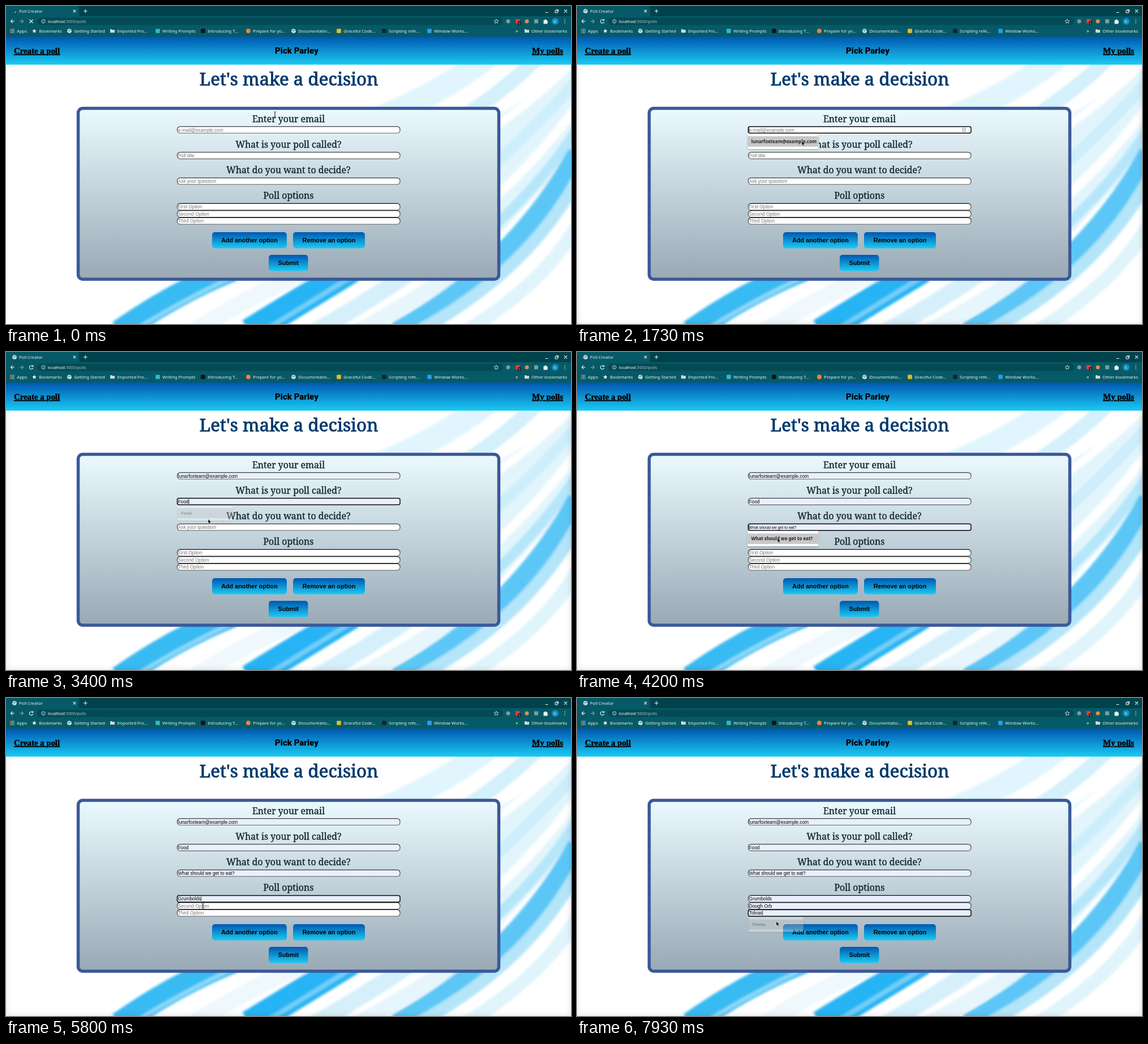
Animation of 998 by 561 pixels, one loop 8000 ms. Source, as an HTML page:

```html
<!DOCTYPE html>
<html lang="en">
<head>
<meta charset="utf-8">
<title>Poll Creator</title>
<style>
  html, body { margin: 0; width: 100%; height: 100%; overflow: hidden; background: #fff; }
  svg { position: absolute; left: 0; top: 0; }
  text { white-space: pre; }
  .ui { font: 7.6px "Noto Sans", sans-serif; fill: #e9f1f2; }
  .url { font-size: 7.2px; fill: #fff; }
  .title { font: 31.3px "Noto Serif", serif; fill: #03396c; stroke: #03396c; stroke-width: .9; text-anchor: middle; }
  .label { font: 15.9px "Noto Serif", serif; fill: #10262b; stroke: #10262b; stroke-width: .35; text-anchor: middle; }
  .nav { font: bold 14.8px "Liberation Serif", serif; stroke: #000; stroke-width: .45; text-decoration: underline; }
  .brand { font: 900 15px Roboto, sans-serif; text-anchor: middle; }
  .button { font: bold 10.8px "Liberation Sans", sans-serif; text-anchor: middle; }
  .value { font: 8.28px "Liberation Sans", sans-serif; }
  .hint { font: 600 8px "Noto Sans", sans-serif; fill: #222; }
</style>
</head>
<body>
<svg id="stage" width="998" height="561" viewBox="0 0 998 561">
  <defs>
    <linearGradient id="sea" x2="0" y2="1"><stop stop-color="#0057b0"/><stop offset="1" stop-color="#1bcaf3"/></linearGradient>
    <linearGradient id="panel" x2="0" y2="1"><stop stop-color="#ebfaff"/><stop offset="1" stop-color="#99a9b5"/></linearGradient>
    <linearGradient id="rim" x2="0" y2="1"><stop stop-color="#111"/><stop offset="1" stop-color="#666"/></linearGradient>
    <filter id="soft"><feGaussianBlur stdDeviation="2"/></filter>
    <filter id="edgeBlur"><feGaussianBlur stdDeviation="5"/></filter>
    <filter id="shade" x="-10%" y="-20%" width="120%" height="150%"><feDropShadow dx="0" dy="1" stdDeviation="1" flood-opacity=".4"/></filter>
    <g id="globe"><circle r="3.8" fill="#e9f1f2"/><path d="M-3-1l2 .2 1 1.3-1 2M1-3l-.5 1.5 2.5 1" fill="none" stroke="#065a67"/></g>
    <path id="folder" d="M-4-3h3l1 1h4v5h-8z" fill="#cfd8da"/>
    <path id="star" d="M0-3.8l1.1 2.5 2.7.2-2 1.8.6 2.7L0 2l-2.4 1.4.6-2.7-2-1.8 2.7-.2z"/>
  </defs>

  <g id="ribbons" fill="none" filter="url(#soft)">
    <path d="M790 230Q900 190 1010 90V270Q930 330 860 420z" fill="#e2f5fc"/>
    <path d="M640 205Q760 160 850 90" stroke="#e0f5fd" stroke-width="42"/>
    <path d="M800 200Q880 150 940 90" stroke="#d3f0fb" stroke-width="26"/>
    <path d="M840 230Q930 170 1005 95" stroke="#fff" stroke-width="14"/>
    <path d="M850 290Q940 210 1010 130" stroke="#cdeefb" stroke-width="20"/>
    <path d="M850 350Q940 270 1010 175" stroke="#fff" stroke-width="16"/>
    <path d="M850 400Q950 310 1010 215" stroke="#b5e6fa" stroke-width="18"/>
    <path d="M200 575Q300 505 400 465" stroke="#38baf3" stroke-width="42"/>
    <path d="M222 575Q300 525 400 478" stroke="#8fdaf8" stroke-width="7"/>
    <path d="M330 575Q440 505 540 465" stroke="#eef8fd" stroke-width="30"/>
    <path d="M430 575Q520 520 610 465" stroke="#27b4f4" stroke-width="48"/>
    <path d="M452 575Q550 515 630 465" stroke="#74d0f8" stroke-width="8"/>
    <path d="M545 575Q650 515 720 465" stroke="#d5f0fb" stroke-width="30"/>
    <path d="M620 575Q730 515 800 465" stroke="#e6f6fc" stroke-width="28"/>
    <path d="M690 575Q900 460 1010 260" stroke="#5cc7f6" stroke-width="36"/>
    <path d="M725 575Q920 470 1010 305" stroke="#b4e5f9" stroke-width="22"/>
    <path d="M810 575Q950 490 1010 385" stroke="#e0f4fc" stroke-width="24"/>
  </g>
  <rect id="edge" x="-2" y="54" width="1002" height="509" fill="none" stroke="#000" stroke-opacity=".1" stroke-width="7" filter="url(#edgeBlur)"/>
  <rect y="54" width="998" height="49.5" fill="url(#sea)"/>
  <text class="nav" x="14" y="84">Create a poll</text>
  <text class="nav" x="984" y="84" text-anchor="end">My polls</text>
  <text class="brand" x="513.5" y="84">Pick Parley</text>

  <rect width="998" height="54" fill="#00434d"/>
  <path d="M0 18V0h125q4 0 4 4v14h869v36H0z" fill="#065a67"/>
  <rect x="55" y="20.5" width="823" height="13" rx="6.5" fill="#044a55"/>
  <g fill="none" stroke="#e9f1f2" stroke-width="1.1">
    <path d="M118.7 6.7l4.6 4.6m0-4.6l-4.6 4.6M137 9h6.6M140.3 5.7v6.6M952.5 11.5h5M986 6.5l5 5m0-5l-5 5M970 8h4v4h-4zM971.5 6.5h4v4"/>
    <path d="M15 27H8.5m3-3l-3 3 3 3"/>
    <path d="M24 27h6.5m-3-3l3 3-3 3" stroke="#7fa4aa"/>
    <path id="stop" d="M41.5 24l6 6m0-6l-6 6"/>
    <path id="reload" d="M47 25a3.2 3.2 0 1 0 .7 3M47.8 23v2.5h-2.5"/>
    <g stroke-width=".8">
      <circle cx="66" cy="27" r="3.2"/><path d="M66 26.5v2.2M66 24.9v.8"/>
      <use href="#star" x="866" y="27"/>
    </g>
  </g>
  <circle id="spinner" cx="16.5" cy="11" r=".9" fill="#e9f1f2"/>
  <use id="tabGlobe" href="#globe" x="15" y="9"/>
  <text class="ui" x="23" y="11.5">Poll Creator</text>
  <text class="ui url" x="74" y="29.6">localhost<tspan fill="#a9c3c7">:5000/polls</tspan></text>
  <circle cx="887" cy="27" r="3.5" fill="#7d9ba0"/>
  <rect x="900" y="23" width="7.5" height="7.5" fill="#e13b36"/>
  <rect x="904.5" y="27" width="5.5" height="6.5" rx="1" fill="#222"/>
  <text class="ui" x="905.7" y="32.6" style="font-size:6px">1</text>
  <circle cx="920" cy="27" r="3.5" fill="#d99146"/>
  <rect x="933" y="23.5" width="7" height="7" fill="#7d9ba0"/>
  <path d="M949.5 25h2a1.4 1.4 0 0 1 2.8 0h2v2a1.4 1.4 0 0 1 0 2.6v1.9h-6.8z" fill="#e9f1f2"/>
  <circle cx="970" cy="27" r="6" fill="#0b8fc9"/><text class="ui" x="967.7" y="29.6" style="font-size:7px">K</text>
  <path d="M987 24v0m0 3v0m0 3v0" stroke="#e9f1f2" stroke-width="1.5" stroke-linecap="round"/>
  <g id="bookmarks"></g>

  <text class="title" x="499.5" y="140">Let's make a decision</text>
  <rect x="127.5" y="180.5" width="743" height="301.5" rx="8" fill="url(#panel)" stroke="#3b5998" stroke-width="5.5"/>
  <g id="form"></g>
  <g id="popups"></g>
  <g id="cursor">
    <path id="beam" d="M-2.2-4.5q2.2 0 2.2 1.2v6.6q0 1.2-2.2 1.2M2.2-4.5Q0-4.5 0-3.3v6.6q0 1.2 2.2 1.2" fill="none" stroke="#333" stroke-width=".8"/>
    <path id="arrow" d="M0 0v8l1.9-1.7 1.3 2.9 1.4-.6-1.3-2.8h2.5z" fill="#111" stroke="#fff" stroke-width=".5"/>
  </g>
</svg>
<script>
const $ = id => document.getElementById(id);
const show = (el, on) => el.setAttribute('visibility', on ? 'visible' : 'hidden');
const setAll = (el, attrs) => Object.entries(attrs).forEach(([k, v]) => el.setAttribute(k, v));
const clamp = v => Math.max(0, Math.min(1, v));

const box = color => `<rect x="-3.8" y="-3.8" width="7.6" height="7.6" rx="1" fill="${color}"/>`;
const dot = color => `<circle r="3.9" fill="${color}"/>`;
const icon = id => `<use href="#${id}" fill="#e9f1f2"/>`;
const apps = [...'012345678'].map(i =>
  `<rect x="${i % 3 * 2.8 - 3.8}" y="${(i / 3 | 0) * 2.8 - 3.8}" width="2" height="2" fill="${['#e66', '#6c8', '#6af'][i % 3]}"/>`).join('');
$('bookmarks').innerHTML = [
  [11, apps, 'Apps'], [50, icon('star'), 'Bookmarks'], [112, icon('globe'), 'Getting Started'],
  [188, icon('folder'), 'Imported Fro…'], [268, box('#35b8c4'), 'Writing Prompts'], [348, box('#111'), 'Introducing T…'],
  [428, dot('#f0803c'), 'Prepare for yo…'], [508, icon('globe'), 'Documentatio…'], [588, box('#e5b932'), 'Graceful Code…'],
  [668, box('#15242d'), 'Scripting refe…'], [748, box('#2a9df0'), 'Window Works…'], [920, icon('folder'), 'Other bookmarks']
].map(([x, art, name]) =>
  `<g transform="translate(${x} 44)">${art}</g><text class="ui" x="${x + 8.3}" y="46.7">${name}</text>`).join('') +
  '<text class="ui" x="900" y="46.5" style="font-size:9px">»</text>';

// Times in ms: popup opens, focus, hover, preview, pick
const fields = [
  { y: 212.7, hint: 'e-mail@example.com', value: 'lunarfoxteam@example.com', width: 125, times: [1330, 1370, 1730, 1800, 2130] },
  { y: 258, hint: 'Poll title', value: 'Food', width: 100, times: [2670, 2730, 2930, 3000, 3270] },
  { y: 303.2, hint: 'Ask your question!', value: 'What should we get to eat?', width: 125, times: [3870, 3800, 4130, 4200, 4400] },
  { y: 348.4, hint: 'First Option', value: 'Grumbolds', width: 100, times: [4930, 5000, 5200, 5270, 5530] },
  { y: 360.9, hint: 'Second Option', value: 'Dough Orb', width: 100, times: [6070, 6130, 6270, 6330, 6670] },
  { y: 373.4, hint: 'Third Option', value: 'Tolvas', width: 100, times: [7130, 7130, 7400, 7470, 7800] }
];
const labels = ['Enter your email', 'What is your poll called?', 'What do you want to decide?', 'Poll options'];
const buttons = [[364, 399, 132, 'Add another option'], [507, 399, 127, 'Remove an option'], [464, 439, 69.5, 'Submit']];

$('form').innerHTML =
  labels.map((s, i) => `<text class="label" x="499" y="${204.5 + i * 45.2}">${s}</text>`).join('') +
  buttons.map(([x, y, w, s]) => `<rect x="${x}" y="${y}" width="${w}" height="28.5" rx="5" fill="url(#sea)"/>
    <text class="button" x="${x + w / 2}" y="${y + 18}">${s}</text>`).join('') +
  fields.map((f, i) => `<g id="field${i}"><rect x="302.5" y="${f.y}" width="393.5" height="11.6"/>
    <text class="value" x="303.8" y="${f.y + 8.8}"></text>
    <path stroke="#000" stroke-width=".7"/></g>`).join('') +
  `<g id="badge" fill="none" stroke="#777" stroke-width=".8"><rect x="681" y="215.5" width="5.5" height="6" rx="1"/>
    <path d="M683.7 217v3"/></g>`;
$('popups').innerHTML = fields.map((f, i) => `<g id="popup${i}">
    <rect x="301.5" y="${f.y + 12.6}" width="${f.width}" height="27" rx="1" fill="#fff" filter="url(#shade)"/>
    <rect x="301.5" y="${f.y + 17}" width="${f.width}" height="18.5" fill="#c8c8c8"/>
    <text class="hint" x="307.7" y="${f.y + 29.2}">${f.value}</text></g>`).join('');

// Pointer stops: time, x, y
const stops = [
  [0, 475, 191], [800, 475, 191], [1070, 424, 219], [1330, 424, 219], [1400, 397, 238], [2130, 397, 238],
  [2400, 378, 264], [2670, 378, 264], [3000, 352, 283], [3270, 352, 283], [3530, 362, 306], [3870, 362, 306],
  [4200, 354, 328], [4400, 354, 328], [4730, 348, 354], [4930, 348, 354], [5200, 350, 374], [5530, 350, 374],
  [5800, 348, 367], [6130, 348, 367], [6330, 346, 386], [6670, 346, 386], [6930, 345.5, 379.5],
  [7400, 345.5, 379.5], [7530, 352, 394], [8000, 352, 394]
];

function drawField(f, i, t) {
  const [open, focus, hover, preview, pick] = f.times;
  const next = fields[i + 1] ? fields[i + 1].times[1] : Infinity;
  const focused = t >= focus && t < next, filled = t >= preview, picked = t >= pick;
  const [rect, text, caret] = $('field' + i).children;
  setAll(rect, {
    fill: filled ? '#e8f0fe' : '#fff',
    stroke: focused ? '#0a0a0a' : 'url(#rim)',
    'stroke-width': focused ? 1.5 : 1.1,
    rx: focused ? 3 : 5
  });
  text.textContent = filled ? f.value : f.hint;
  text.style.fontSize = filled && !picked ? '6.9px' : '';
  text.setAttribute('fill', filled ? '#000' : '#777');
  const x = 304 + (picked ? text.getComputedTextLength() + .3 : 0);
  caret.setAttribute('d', `M${x} ${f.y + 1.8}v8`);
  show(caret, focused);

  const popup = $('popup' + i), fade = clamp((t - pick) / 200);
  const cx = 301.5 + f.width / 2, cy = f.y + 26;
  show(popup, t >= open && fade < 1);
  setAll(popup, {
    opacity: 1 - fade,
    transform: `translate(${cx} ${cy}) scale(${1 - .05 * fade}) translate(${-cx} ${-cy})`
  });
  popup.children[1].setAttribute('opacity', t >= hover ? 1 : 0);
}

function drawCursor(t) {
  const k = stops.findIndex(s => s[0] > t), [t0, x0, y0] = stops[k - 1], [t1, x1, y1] = stops[k];
  const u = (t - t0) / (t1 - t0), ease = u * u * (3 - 2 * u);
  const x = x0 + (x1 - x0) * ease, y = y0 + (y1 - y0) * ease;
  const overPopup = fields.some(f => t >= f.times[0] && t < f.times[4] + 200 && y > f.y + 12.5 && y < f.y + 40);
  $('cursor').setAttribute('transform', `translate(${x} ${y})`);
  show($('arrow'), overPopup);
  show($('beam'), !overPopup);
}

function draw() {
  const t = performance.now() % 8000, loaded = t >= 530;
  for (const id of ['edge', 'reload', 'tabGlobe']) show($(id), loaded);
  for (const id of ['stop', 'spinner']) show($(id), !loaded);
  show($('badge'), t >= 1000 && t < 1800);
  fields.forEach((f, i) => drawField(f, i, t));
  drawCursor(t);
  requestAnimationFrame(draw);
}
draw();
</script>
</body>
</html>
```
